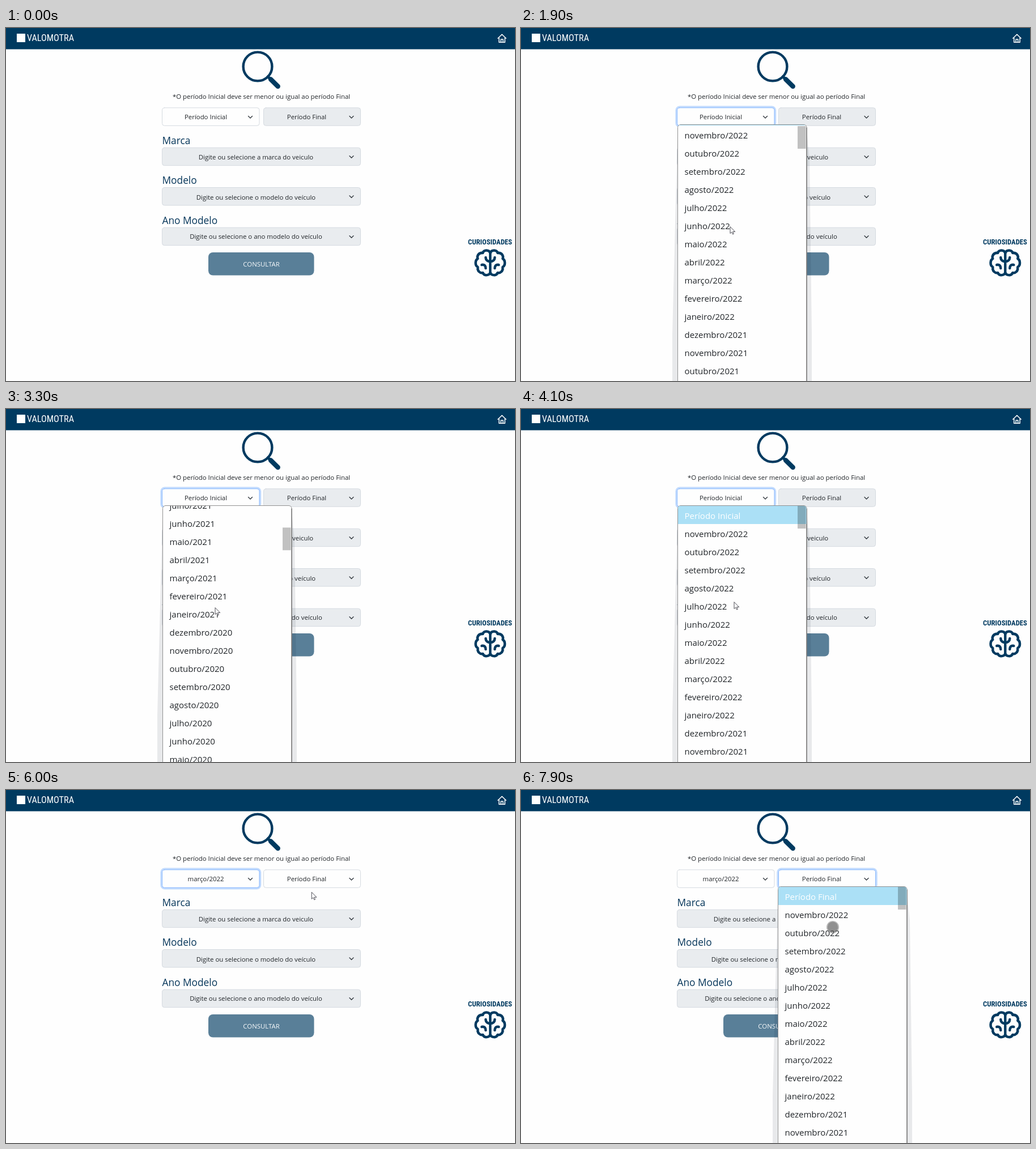
Write an HTML page with a canvas that moves like this. It is 898 px wide and 623 px high and loops after 8 s.

```html
<!DOCTYPE html>
<html lang="pt-BR">
<head>
<meta charset="utf-8">
<title>Consulta</title>
<style>
html, body { margin: 0; width: 100%; height: 100%; overflow: hidden; background: #fefefe; }
canvas { display: block; }
</style>
</head>
<body>
<canvas id="stage" width="898" height="623"></canvas>
<script>
const ctx = document.getElementById('stage').getContext('2d');
const LOOP = 8000, STEP = 100, ROW = 32, FIRST = 188.5;
const NAVY = '#003a60', INK = '#212529', SKY = '#abe0f6';
const SANS = '"Open Sans", "Noto Sans", sans-serif';
const NARROW = '"Roboto Condensed", "Open Sans Condensed", "Liberation Sans Narrow", Roboto, sans-serif';
const MONTHS = ['dezembro', 'novembro', 'outubro', 'setembro', 'agosto', 'julho',
  'junho', 'maio', 'abril', 'março', 'fevereiro', 'janeiro'];

// [time, x, y]
const POINTER = [
  [300, 60, 4], [700, 310, 324], [1100, 364, 160], [1300, 364, 160],
  [1900, 369, 351], [3800, 369, 351], [4100, 376, 341], [4300, 376, 341],
  [5100, 343.5, 464.5], [5300, 343.5, 464.5], [6100, 548, 168], [6500, 548, 168],
  [6700, 562, 214], [7300, 550, 235], [7900, 550, 242]
];
// [time, offset]
const SCROLL = [
  [1800, 0], [2400, 418], [2500, 418], [2900, 900], [3000, 900],
  [3400, 500], [3800, 500], [4100, 0]
];

function sample(keys, t) {
  if (t <= keys[0][0]) return keys[0].slice(1);
  for (let i = 1; i < keys.length; i++) {
    const a = keys[i - 1], b = keys[i];
    if (t > b[0]) continue;
    const k = (t - a[0]) / (b[0] - a[0]);
    const e = k * k * (3 - 2 * k);
    return a.slice(1).map((v, j) => v + (b[j + 1] - v) * e);
  }
  return keys[keys.length - 1].slice(1);
}

function text(str, x, y, size, color = INK, align = 'left') {
  ctx.font = `${size}px ${SANS}`;
  ctx.fillStyle = color;
  ctx.textAlign = align;
  ctx.fillText(str, x, y);
}

// Condensed caps centred on y, with the largest size that keeps within the room.
function narrow(str, x, y, room, weight, color, align) {
  const setFont = size => { ctx.font = `${weight} condensed ${size}px ${NARROW}`; };
  setFont(20);
  const size = Math.min(20, 20 * room / ctx.measureText(str).width);
  setFont(size);
  ctx.fillStyle = color;
  ctx.textAlign = align;
  ctx.fillText(str, x, y + size * 0.355);
}

function box(x, y, w, h, r, fill, stroke, width = 1) {
  ctx.beginPath();
  ctx.roundRect(x, y, w, h, r);
  if (fill) { ctx.fillStyle = fill; ctx.fill(); }
  if (stroke) { ctx.strokeStyle = stroke; ctx.lineWidth = width; ctx.stroke(); }
}

function line(path, color, width) {
  ctx.strokeStyle = color;
  ctx.lineWidth = width;
  ctx.lineCap = ctx.lineJoin = 'round';
  ctx.stroke(new Path2D(path));
}

function select(label, x, y, w, cx, base, enabled, focused) {
  if (focused) box(x - 1.5, y - 1.5, w + 3, 34.5, 6, null, '#c2dbfe', 3.4);
  box(x, y, w, 31.5, 4, enabled ? '#fefefe' : '#e9ecef', focused ? '#86b7fe' : '#d5dae0');
  text(label, cx, base, 11.4, INK, 'center');
  const r = x + w - 16, c = y + 16.3;
  line(`M${r - 3.5} ${c - 1.7}L${r} ${c + 1.8}L${r + 3.5} ${c - 1.7}`, '#343a40', 1.4);
}

function header() {
  ctx.fillStyle = NAVY;
  ctx.fillRect(0, 0, 898, 37.5);
  ctx.fillStyle = '#fff';
  ctx.fillRect(19, 10, 15, 15);
  narrow('VALOMOTRA', 37, 17.5, 83, 400, '#fff', 'left');
  line('M867.8 18.3L875 11.2L882.2 18.3M869.8 17V25.3H880.2V17M873.2 25V20H876.8V25', '#fff', 1.5);
}

function lens() {
  ctx.beginPath();
  ctx.arc(444, 68, 25.4, 0, 7);
  ctx.strokeStyle = NAVY;
  ctx.lineWidth = 4.4;
  ctx.stroke();
  line('M462 86L470 93', NAVY, 5);
  line('M467 90.5L479.7 103', NAVY, 8.4);
}

function brain() {
  narrow('CURIOSIDADES', 854, 377.5, 78, 700, NAVY, 'center');
  for (const side of [1, -1]) {
    ctx.save();
    ctx.translate(854.3, 414);
    ctx.scale(side, 1);
    line('M0 -17C-2 -23 -12 -23 -13 -17C-20 -18 -24 -12 -22 -7C-27 -4 -27 5 -22 8' +
      'C-23 15 -18 19 -13 18C-11 24 -2 23 0 18M0 -2C-5 -2 -8 -5 -8 -9' +
      'M-15 4C-10 3 -8 6 -8 10', NAVY, 4.5);
    ctx.restore();
  }
  line('M854.3 397V432', NAVY, 4.4);
}

function form(start, endOpen, focus) {
  text('*O período Inicial deve ser menor ou igual ao período Final', 450.5, 124.5, 11.4, INK, 'center');
  select(start, 275.5, 140.8, 171.5, 352.5, 161, true, focus === 1);
  select('Período Final', 454.5, 140.8, 171, 530.5, 161, endOpen, focus === 2);
  const rows = [
    ['Marca', 'Digite ou selecione a marca do veiculo', 204.5, 211.2, 231.5],
    ['Modelo', 'Digite ou selecione o modelo do veículo', 274.8, 281.5, 302.5],
    ['Ano Modelo', 'Digite ou selecione o ano modelo do veículo', 345.8, 352.2, 372.2]
  ];
  for (const [head, hint, hy, y, base] of rows) {
    text(head, 275.5, hy, 17.3, '#06365a');
    select(hint, 275.5, y, 350, 441, base, false);
  }
  box(357, 396, 186.5, 40.5, 8, '#597f98');
  text('CONSULTAR', 450.5, 421, 11.4, '#f6f9fb', 'center');
}

function shade(points) {
  ctx.fillStyle = 'rgba(10,20,40,.085)';
  ctx.fill(new Path2D('M' + points + 'Z'));
}

// Option list; a ghost shows only its frame and shadow.
function popup(title, dx, dy, { ghost, scroll = 0, active = 0 }) {
  ctx.save();
  ctx.translate(dx, dy);
  shade('276 190L267 540V630H276');
  shade('504 180L509 230L513 540V630H504');
  if (ghost) {
    box(276.5, 171, 228, 500, 6, null, '#a6a8ac', 1.8);
    ctx.restore();
    return;
  }
  box(276.5, 170.5, 227.5, 500, 5, '#fefefe', '#929292', 1);
  line('M504 176V630', '#777', 1.4);
  ctx.save();
  ctx.beginPath();
  ctx.roundRect(277, 171, 226.5, 500, 4.5);
  ctx.clip();
  const from = Math.floor(scroll / ROW);
  for (let i = from; i < from + 16; i++) {
    const y = FIRST + i * ROW - scroll;
    const on = i === active;
    if (on) {
      ctx.fillStyle = SKY;
      ctx.fillRect(276, y - 17.5, 228, ROW);
    }
    const name = i ? `${MONTHS[i % 12]}/${2022 - Math.floor(i / 12)}` : title;
    text(name, 288.5, y + 5.5, 15, on ? '#fff' : INK);
  }
  ctx.fillStyle = 'rgba(0,0,0,.24)';
  ctx.fillRect(488, 171 + scroll * 0.068, 14.5, 40);
  ctx.restore();
  ctx.restore();
}

function arrow(x, y) {
  const p = new Path2D(`M${x} ${y}v11.6l2.7 -2.5l1.9 4l1.8 -.8l-1.8 -3.8h3.7z`);
  ctx.fillStyle = '#fff';
  ctx.fill(p);
  ctx.strokeStyle = '#3c3c44';
  ctx.lineWidth = 0.9;
  ctx.stroke(p);
}

function press(x, y) {
  ctx.beginPath();
  ctx.arc(x, y, 9.4, 0, 7);
  ctx.fillStyle = 'rgba(90,90,90,.67)';
  ctx.fill();
  ctx.beginPath();
  ctx.arc(x, y, 10.2, 0, 7);
  ctx.strokeStyle = 'rgba(120,120,120,.5)';
  ctx.lineWidth = 1.8;
  ctx.stroke();
}

function draw(t) {
  const within = (a, b) => t >= a && t < b;
  const [x, y] = sample(POINTER, t);
  ctx.fillStyle = '#fefefe';
  ctx.fillRect(0, 0, 898, 623);
  header();
  lens();
  brain();

  const chosen = t >= 5200;
  const focus = within(1400, 6300) ? 1 : t >= 6400 ? 2 : 0;
  form(chosen ? 'março/2022' : 'Período Inicial', chosen, focus);

  if (within(1200, 1400)) popup('Período Inicial', 0, 0, { ghost: true });
  if (within(1400, 5200)) {
    const active = t >= 4400 ? Math.round((y - FIRST + 1.5) / ROW) : 0;
    popup('Período Inicial', 0, t < 1500 ? -1 : 0, { scroll: sample(SCROLL, t)[0], active });
  }
  if (within(6300, 6400)) popup('Período Final', 176, 0, { ghost: true });
  if (t >= 6400) {
    const shift = t < 6600 ? -1 : 0;
    popup('Período Final', 177 + shift, shift, {});
  }

  if (within(1200, 1400) || within(5200, 5400) || t >= 6300) press(x, y);
  else if (t >= 300) arrow(x, y);
}

const began = performance.now();
function tick() {
  const t = (performance.now() - began) % LOOP;
  draw(Math.floor(t / STEP) * STEP);
  requestAnimationFrame(tick);
}
tick();
</script>
</body>
</html>
```
